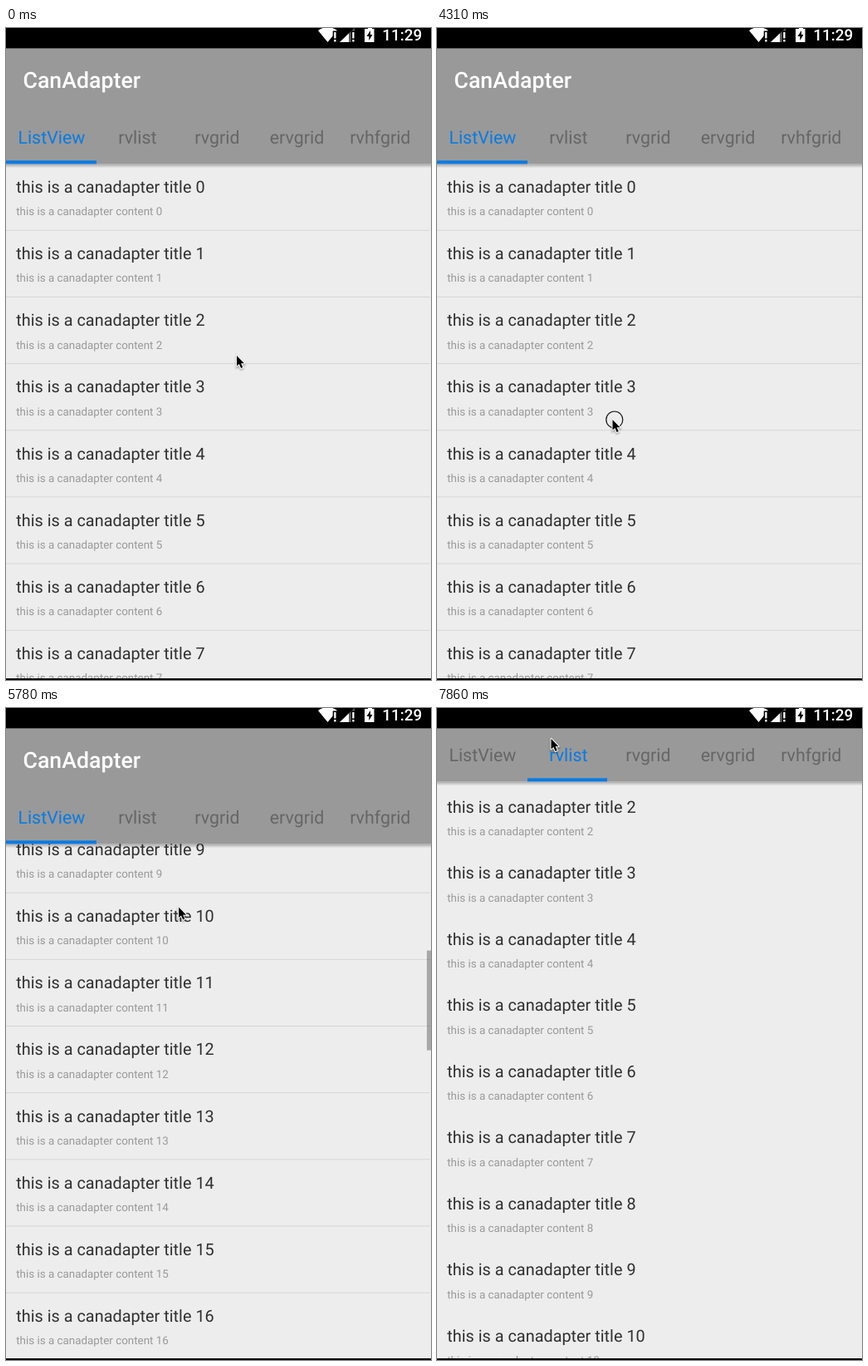
Write an HTML page that moves like this. It is 512 px wide and 784 px high and loops after 8000 ms.

```html
<!DOCTYPE html>
<html lang="en">
<head>
<meta charset="utf-8">
<style>
  html, body { margin: 0; width: 100%; height: 100%; overflow: hidden; background: #ededed; }
  svg { display: block; width: 100vw; height: 100vh; }
  text { font-family: Roboto, "Noto Sans", sans-serif; text-rendering: geometricPrecision; white-space: pre; }
  .title { font-size: 19.88px; fill: #303030; }
  .content { font-size: 13.4px; fill: #999; }
  .tab { font-size: 21.4px; text-anchor: middle; }
</style>
</head>
<body>
<svg viewBox="0 0 512 784">
  <defs>
    <linearGradient id="shade" x1="0" y1="0" x2="0" y2="1">
      <stop offset="0" stop-color="#000" stop-opacity=".3"/>
      <stop offset="1" stop-color="#000" stop-opacity="0"/>
    </linearGradient>
    <filter id="soft" x="-50%" y="-50%" width="200%" height="200%">
      <feGaussianBlur stdDeviation="1"/>
    </filter>
    <path id="arrow" d="M0 0V12.600L2.900 10L5.100 15L7.300 14L5.100 9.200H9Z"/>
    <path id="alert" d="M0 0H2.300V7.500H0ZM0 9H2.300V11.500H0Z" stroke="#000" stroke-width="3" paint-order="stroke"/>
  </defs>
  <rect width="512" height="784" fill="#ededed"/>
  <g id="listPage"></g>
  <g id="recyclerPage"></g>
  <rect id="scrollbar" x="507" width="5" height="120"/>
  <g id="header">
    <rect y="163.400" width="512" height="5" fill="url(#shade)"/>
    <rect y="24" width="512" height="139.400" fill="#999"/>
    <text x="20.500" y="72" font-size="26.700" font-weight="500" fill="#fff">CanAdapter</text>
    <g id="tabs"></g>
    <rect id="indicator" y="159.400" height="4" fill="#087be4"/>
  </g>
  <g fill="#fff">
    <rect width="512" height="24.400" fill="#000"/>
    <path d="M376 3Q387.500 -5 399 3L387.500 17Z"/>
    <use href="#alert" x="395.200" y="5"/>
    <path d="M402 17H420V0Z" fill="#606060"/>
    <path d="M402 17H413V6.500Z"/>
    <use href="#alert" x="417.200" y="5"/>
    <path d="M436 -1H441V1H443.500V17H432V1H436Z"/>
    <path d="M439 3L434.500 10H437.300V15L441.500 8H439Z" fill="#000"/>
    <text x="453.300" y="15" font-size="18.900" font-weight="500">11:29</text>
  </g>
  <rect y="782" width="512" height="2" fill="#000"/>
  <g id="cursor">
    <circle id="press" cx="2.300" r="10" fill="none" stroke="#111" stroke-width="1.200"/>
    <use href="#arrow" y="1.500" stroke="#000" stroke-width="2" opacity=".35" filter="url(#soft)"/>
    <use href="#arrow" stroke="#fff" stroke-width="2" stroke-linejoin="round" paint-order="stroke"/>
  </g>
</svg>
<script>
const LOOP = 8000, STEP = 147.4, PHASE = 10; // the screen updates once per STEP ms
const TOP = 163, WIDTH = 512, TOOLBAR = 75;
const DRAGGED = 190.3, MAX_SCROLL = 3313.6, BAR_TRAVEL = 574, RECYCLER_PULL = 231.3;
const BLUE = '#087be4', GREY = '#666';
const $ = id => document.getElementById(id);

function add(parent, tag, attrs, text = '') {
  const node = document.createElementNS('http://www.w3.org/2000/svg', tag);
  for (const key in attrs) node.setAttribute(key, attrs[key]);
  node.textContent = text;
  return parent.appendChild(node);
}
const move = (node, x, y) => node.setAttribute('transform', `translate(${x} ${y})`);

// All motion is a function of n, the number of the current screen update.
const ramp = (n, from, to) => Math.min(1, Math.max(0, (n - from) / (to - from)));
const smooth = p => p * p * (3 - 2 * p);
const easeIn = p => p ** 2.5;
const easeOut = (p, power) => 1 - (1 - p) ** power;

// The pointer wanders straight between a few resting and turning points.
const stops = [
  { n: 6, x: 278, y: 394 }, { n: 8, x: 440, y: 646 },
  { n: 17, x: 440, y: 646 }, { n: 18, x: 406, y: 559 },
  { n: 21, x: 235, y: 387 }, { n: 25, x: 206, y: 472 },
  { n: 29, x: 211.5, y: 471 }, { n: 31, x: 209, y: 285 },
  { n: 36, x: 213.5, y: 540.5 }, { n: 41, x: 204.5, y: 39 },
  { n: 44, x: 168, y: 132 }, { n: 47, x: 159.5, y: 141 },
  { n: 51, x: 152, y: 330 }, { n: 53, x: 137.5, y: 37 },
];
const touches = [29, 37, 51];

function pointerAt(n) {
  let { x, y } = stops[0];
  for (let i = 1; i < stops.length; i++) {
    const a = stops[i - 1], b = stops[i], p = ramp(n, a.n, b.n);
    x += (b.x - a.x) * p;
    y += (b.y - a.y) * p;
  }
  return [x, y];
}

function makePage(root, pitch, divided) {
  const rows = Array.from({ length: 10 }, () => {
    const g = add(root, 'g', {});
    const title = add(g, 'text', { class: 'title', x: 12.3, y: 35 });
    const content = add(g, 'text', { class: 'content', x: 12.2, y: 62.3 });
    if (divided) add(g, 'rect', { y: 79.8, width: WIDTH - 1, height: 1, fill: '#d6d6d6' });
    return { g, title, content };
  });
  return (x, scroll) => {
    move(root, x, TOP);
    const first = Math.floor(scroll / pitch);
    rows.forEach((row, i) => {
      const index = first + i;
      move(row.g, 0, index * pitch - scroll);
      row.title.textContent = `this is a canadapter title ${index}`;
      row.content.textContent = `this is a canadapter content ${index}`;
    });
  };
}

const drawList = makePage($('listPage'), 80.15, true);
const drawRecycler = makePage($('recyclerPage'), 79.52, false);
const tabs = Object.entries({ ListView: 54.9, rvlist: 158.4, rvgrid: 254.4, ervgrid: 350.5, rvhfgrid: 450.8 })
  .map(([name, x]) => add($('tabs'), 'text', { class: 'tab', x, y: 139 }, name));

function draw(n) {
  const scroll = DRAGGED * easeOut(ramp(n, 29, 32), 2)
    + (MAX_SCROLL - DRAGGED) * easeIn(ramp(n, 37, 41));
  const barShown = ramp(n, 29, 30) - ramp(n, 34, 36.3) + ramp(n, 37, 38) - ramp(n, 42, 44);
  const shift = WIDTH * easeOut(ramp(n, 46.6, 48.3), 5);
  const slide = smooth(ramp(n, 46.83, 48.58));
  const pull = RECYCLER_PULL * ramp(n, 51, 53);

  drawList(-shift, scroll);
  drawRecycler(WIDTH - shift, pull);
  $('scrollbar').setAttribute('y', TOP + scroll / MAX_SCROLL * BAR_TRAVEL);
  $('scrollbar').setAttribute('opacity', .29 * barShown);

  move($('header'), 0, -Math.min(TOOLBAR, pull));
  const active = slide > 0 ? 1 : 0;
  tabs.forEach((tab, i) => tab.setAttribute('fill', i === active ? BLUE : GREY));
  $('indicator').setAttribute('x', 109 * slide);
  $('indicator').setAttribute('width', 109 - 13 * slide);

  move($('cursor'), ...pointerAt(n));
  const pressed = touches.some(start => n >= start && n < start + 2);
  $('press').setAttribute('visibility', pressed ? 'visible' : 'hidden');
}

const start = performance.now();
function frame() {
  const t = (performance.now() - start) % LOOP;
  draw(Math.floor((t - PHASE) / STEP));
  requestAnimationFrame(frame);
}
frame();
</script>
</body>
</html>
```
